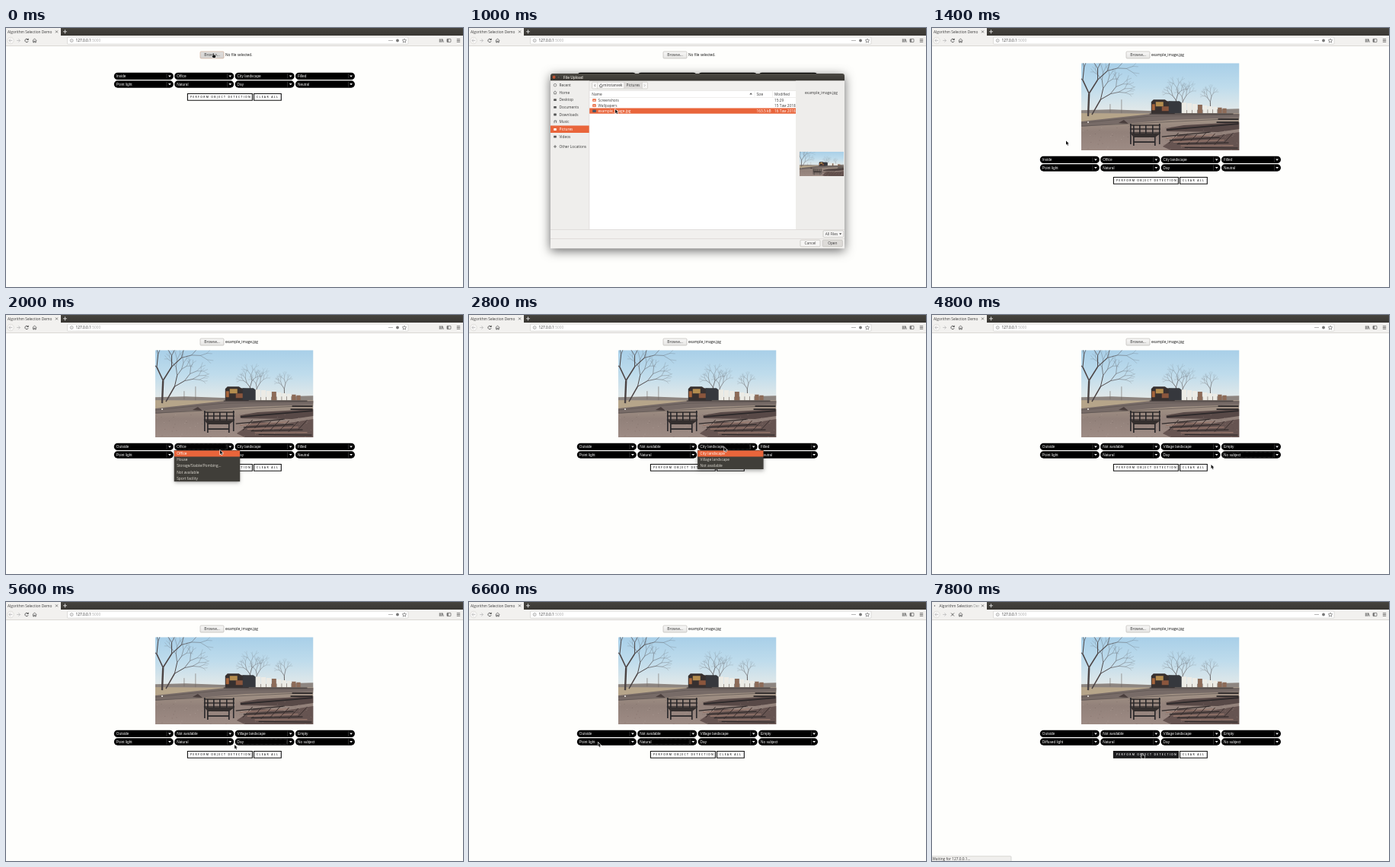
An HTML page with a canvas for the animation above (8 s loop, 600 by 341 pixels).

```html
<!DOCTYPE html>
<html lang="en">
<head>
<meta charset="utf-8">
<title>Algorithm Selection Demo</title>
<style>
  html, body { margin: 0; width: 100%; height: 100%; overflow: hidden; background: #fefefc; }
  canvas { display: block; width: 100vw; height: 100vh; }
</style>
</head>
<body>
<canvas id="stage"></canvas>
<script>
const STEP = 200, LOOP = 8000;
const UI = '4.8px "Open Sans", sans-serif';
const UI_BOLD = '600 4.8px "Open Sans", sans-serif';
const FORM = '4.75px "Liberation Sans", Arial, sans-serif';
const CAPS = '600 3.4px "Open Sans", sans-serif';
const ORANGE = '#e9653b', DARK = '#3d3b36', INK = '#3b3b3b';

const canvas = document.getElementById('stage');
const scale = window.devicePixelRatio || 1;
canvas.width = 600 * scale;
canvas.height = 341 * scale;
const ctx = canvas.getContext('2d');

// ---------- drawing helpers ----------
function rect(x, y, w, h, fill, stroke, radius = 0, lineWidth = 0.6) {
  ctx.beginPath();
  ctx.roundRect(x, y, w, h, radius);
  if (fill) { ctx.fillStyle = fill; ctx.fill(); }
  if (stroke) { ctx.strokeStyle = stroke; ctx.lineWidth = lineWidth; ctx.stroke(); }
}
function circle(x, y, r, fill, stroke) { rect(x - r, y - r, 2 * r, 2 * r, fill, stroke, r); }
function line(d, color = INK, width = 0.8) {
  ctx.strokeStyle = color;
  ctx.lineWidth = width;
  ctx.stroke(new Path2D(d));
}
function shape(d, color) {
  ctx.fillStyle = color;
  ctx.fill(new Path2D(d));
}
function text(s, x, y, color = INK, font = UI, spacing = 0, align = 'left') {
  ctx.font = font;
  ctx.letterSpacing = spacing + 'px';
  ctx.textAlign = align;
  ctx.fillStyle = color;
  ctx.fillText(s, x, y);
}
function vertical(y0, y1, ...colors) {
  const g = ctx.createLinearGradient(0, y0, 0, y1);
  colors.forEach((c, i) => g.addColorStop(i / (colors.length - 1), c));
  return g;
}
function withShadow(blur, offset, alpha, draw) {
  ctx.save();
  ctx.shadowColor = `rgba(0,0,0,${alpha})`;
  ctx.shadowBlur = blur * scale;
  ctx.shadowOffsetY = offset * scale;
  draw();
  ctx.restore();
}
function seeded(seed) {
  return () => (seed = (seed * 16807) % 2147483647) / 2147483647;
}

// ---------- photograph, 208 by 115 units ----------
function tree(x, y, length, angle, width, depth, random) {
  const x2 = x + length * Math.cos(angle), y2 = y + length * Math.sin(angle);
  line(`M${x} ${y}L${x2} ${y2}`, '#4b4343', width);
  if (!depth) return;
  for (const turn of [-0.45, 0.4]) {
    tree(x2, y2, length * (0.65 + 0.25 * random()), angle + turn * (0.6 + 0.8 * random()),
      width * 0.65, depth - 1, random);
  }
}
function photo(x, y, width) {
  ctx.save();
  ctx.translate(x, y);
  ctx.scale(width / 208, width / 208);
  ctx.beginPath();
  ctx.rect(0, 0, 208, 115);
  ctx.clip();
  rect(0, 0, 208, 66, vertical(0, 64, '#a8cfe8', '#bfdcec', '#e3e9e9'));
  shape('M0 62L40 61L95 63L208 60V70H0Z', '#8d8580');
  rect(0, 66, 208, 49, vertical(66, 115, '#aa9b8b', '#92817a', '#9d8b84'));
  shape('M0 66L92 67L60 74L0 80Z', '#b6a58a');
  shape('M0 77L90 67H208V72L120 75L0 84Z', '#776b67');

  tree(9, 70, 30, -1.53, 2.4, 6, seeded(12));
  tree(14, 68, 23, -1.05, 1.5, 5, seeded(31));
  tree(125, 60, 11, -1.6, 1, 5, seeded(7));
  tree(131, 60, 10, -1.3, 0.8, 5, seeded(19));
  tree(170, 60, 9, -1.6, 0.8, 5, seeded(44));
  line('M53 48V66M38 54V65', '#716762', 0.6);

  shape('M92 51L95 48H110L113 50L123 51V67H92Z', '#37302f');
  rect(93, 54, 4, 8, '#a5643b');
  rect(98, 51, 10, 6, '#b48d4f');
  rect(106, 57, 10, 6, '#8a563d');
  shape('M115 50H129L133 53V66H115Z', '#36383d');
  for (let i = 0; i < 9; i++) {
    const left = 132 + i * 7.3 - i * i * 0.07, top = 52 + i * 0.95;
    rect(left, top, 6.4 - i * 0.15, 66 - top, i === 3 || i > 6 ? '#8c6b58' : '#ecebe5');
  }
  line('M90 67H200', '#433d3c', 1.4);
  line('M0 79L90 70L208 68M0 83L208 73', '#5c5350', 0.7);
  shape('M49 79L56 75L62 80Z', '#493e3c');
  circle(9, 78, 1, '#f2eee8');

  shape('M112 86L135 82L208 78V87L180 91L112 90Z', '#584947');
  shape('M107 110L130 94L170 97L208 91V115H118Z', '#665451');
  for (let i = 0; i < 7; i++) {
    line(`M${106 + i * 5} ${97 + i * 2.4}L${170 + i * 6} ${91 + i * 3.5}`, i % 2 ? '#99796d' : '#302a2a', 1.3);
    line(`M${128 + i * 12} ${92 + i % 3}l-13 14`, '#3a302f', 1);
  }
  line('M112 88L207 80M180 74H207M178 78H207', '#2c2829', 1.8);

  line('M64 82H104M64 87H104M64 92H104', '#322c2b', 1.5);
  line('M65 80V107M69 82V97M77 82V93M85 82V93M94 82V93M103 80V107', '#28272a', 1.6);
  shape('M65 93H104L97 98H69Z', '#342f2e');
  line('M69 97V109M97 97V109M69 104H97', '#292729', 1.7);

  const random = seeded(99);
  for (let i = 0; i < 90; i++) {
    rect(random() * 208, 83 + random() * 32, 1.2, 0.5, i % 2 ? 'rgba(60,45,42,.3)' : 'rgba(220,205,195,.35)');
  }
  ctx.restore();
}

// ---------- browser window ----------
function browser(loading) {
  rect(0, 0, 600, 341, '#fefefc');
  rect(0, 0, 600, 10.5, vertical(0, 10, '#45433e', '#393733'));
  rect(0, 0, 72, 11, '#f2f1ef');
  ctx.save();
  ctx.beginPath();
  ctx.rect(0, 0, 62, 10);
  ctx.clip();
  text('Algorithm Selection Demo', loading ? 9.5 : 2, 6.8);
  ctx.restore();
  if (loading) {
    circle(3.5, 5, 0.7, '#555');
    rect(54, 1, 9, 8, 'rgba(242,241,239,.5)');
  }
  line('M65 3.4l3 3m0-3l-3 3', '#555', 0.7);
  line('M75 4.8h5M77.5 2.3v5', '#ddd', 0.9);

  rect(0, 10, 600, 13.3, '#f2f1ef');
  rect(0, 23.1, 600, 0.6, '#cfcdca');
  circle(6, 16.5, 4.3, '#f7f6f5', '#d4d2cf');
  line('M8.2 16.5H4M6 14.4l-2.1 2.1l2.1 2.1', '#bbb');
  line('M14.3 16.5h4.2M16.5 14.4l2.1 2.1l-2.1 2.1', '#bbb');
  if (loading) line('M25 14.5l4 4m0-4l-4 4', '#444');
  else {
    line('M28.7 15A2.2 2.2 0 1 0 29.2 17.2', '#444');
    shape('M29.6 13.4V16H27Z', '#444');
  }
  line('M34.8 16.7L37.5 14l2.7 2.7M35.7 16.3v2.7h1.2v-1.7h1.2v1.7h1.2v-2.7', '#444', 0.7);

  rect(80.5, 12, 447.5, 9.2, '#fff', '#cbc9c6', 1);
  circle(86.2, 16.5, 2, null, '#888');
  line('M86.2 16v1.7M86.2 15v.6', '#888', 0.5);
  text('127.0.0.1', 91.5, 18.3, '#222');
  text(':5000', 112, 18.3, '#aaa');
  for (const x of [503, 505, 507]) circle(x, 16.5, 0.55, '#555');
  circle(514, 16.5, 1.9, '#777');
  line('M523 14l.8 1.7 1.9.2-1.4 1.3.4 1.9-1.7-1-1.7 1 .4-1.9-1.4-1.3 1.9-.2Z', '#555', 0.6);
  line('M569.3 14.3v4.5M570.8 14.3v4.5M572.3 14.3v4.5M573 14.5l1.4 4.3', '#444', 0.7);
  rect(579, 14.4, 5, 4.2, null, '#444', 0.5);
  rect(579, 14.4, 2, 4.2, '#777');
  line('M591.8 14.7h4.4M591.8 16.5h4.4M591.8 18.3h4.4', '#444', 0.7);

  if (loading) {
    rect(-1, 334.7, 105, 8, '#f0efed', '#c5c3c0', 1);
    text('Waiting for 127.0.0.1…', 0.5, 340.1);
  }
}

// ---------- page ----------
const selects = [
  ['Inside', 'Outside'],
  ['Office', 'House', 'Storage/Stable/Pombing...', 'Not available', 'Sport facility'],
  ['City landscape', 'Village landscape', 'Not available'],
  ['Filled', 'Empty'],
  ['Point light', 'Diffused light', 'Not available'],
  ['Natural', 'Artificial', 'Not available'],
  ['Day', 'Night', 'Not available'],
  ['Neutral', 'Happy', 'Sad', 'Angry', 'Surprised', 'Scared', 'Disgusted', 'No subject'],
].map((options, i) => ({ options, x: 141.8 + (i % 4) * 79.4, y: i < 4 ? 58.7 : 69.3 }));

function selectBox(index, value, focused, shift) {
  const { options, x, y: base } = selects[index], y = base + shift;
  rect(x, y, 78, 9.4, '#000', null, 4.7);
  rect(x + 69, y + 1, 0.4, 7.4, '#666');
  shape(`M${x + 71.2} ${y + 3.8}h3.8l-1.9 2.2Z`, '#fff');
  text(options[value], x + 3, y + 6.4, '#f4f4f4', FORM);
  if (focused) {
    ctx.setLineDash([0.6, 0.6]);
    rect(x + 2, y + 1.3, 66, 6.8, null, '#999', 0, 0.4);
    ctx.setLineDash([]);
  }
}
function dropdown(index, hot, shift) {
  const { options, x, y: base } = selects[index], y = base + shift + 9.4;
  const rowHeight = 8.1;
  withShadow(5, 2, 0.35, () => rect(x - 0.5, y, 86.5, options.length * rowHeight + 0.6, '#403e39'));
  options.forEach((label, i) => {
    const top = y + 0.3 + i * rowHeight;
    if (i === hot) rect(x - 0.2, top, 86, rowHeight, ORANGE);
    text(label, x + 3, top + 5.8, i === hot ? '#fff' : '#dedad2');
  });
}
function outlineButton(label, x, y, width, pressed) {
  rect(x, y, width, 8.7, pressed ? '#1d1d1f' : '#fff', '#111', 0, 1.1);
  text(label, x + 3.5, y + 5.7, pressed ? '#fff' : '#222', CAPS, 1.33);
}
function page(s) {
  const shift = s.loaded ? 110 : 0;
  rect(255, 31, 31, 9, vertical(31, 40, s.hoverBrowse ? '#dedddc' : '#f8f8f7', s.hoverBrowse ? '#d5d3d1' : '#e6e5e3'),
    s.hoverBrowse ? '#c9a18c' : '#b4b1ad', 1.2);
  text('Browse...', 270.5, 37.3, '#333', UI, 0, 'center');
  text(s.loaded ? 'example_image.jpg' : 'No file selected.', 288, 37.3, '#111');
  if (s.loaded) photo(196, 46.3, 207.5);
  selects.forEach((_, i) => selectBox(i, s.values[i], s.focus === i, shift));
  outlineButton('PERFORM OBJECT DETECTION', 238.4, 86.5 + shift, 85, s.pressed);
  outlineButton('CLEAR ALL', 325.5, 86.5 + shift, 35.8);
  if (s.open !== null) dropdown(s.open, s.hot, shift);
}

// ---------- file dialog ----------
function dialogButton(label, x, y, width, fill = '#f6f5f4') {
  rect(x, y, width, 8.6, fill, '#b8b5b1', 1.2);
  text(label, x + width / 2, y + 6, INK, UI, 0, 'center');
}
function fileDialog(selected) {
  withShadow(14, 3, 0.6, () => rect(107, 60, 386, 230.3, '#f1f0ee', null, [3, 3, 0, 0]));
  rect(107, 60, 386, 9.5, vertical(60, 69, '#4b4943', '#393733'), null, [3, 3, 0, 0]);
  circle(111.6, 64.8, 2.2, ORANGE, '#2d2b28');
  line('M110.8 64l1.6 1.6m0-1.6l-1.6 1.6', '#50291b', 0.5);
  circle(117.6, 64.8, 1.9, '#56534d', '#2d2b28');
  text('File Upload', 124, 66.6, '#e6e2da', UI_BOLD);

  rect(107, 69.5, 51, 195.5, '#efeeec');
  rect(158, 82, 271, 183, '#fff');
  rect(157.7, 69.5, 0.5, 195.5, '#d0cdca');
  const places = ['Recent', 'Home', 'Desktop', 'Documents', 'Downloads', 'Music', 'Pictures', 'Videos', 'Other Locations'];
  places.forEach((name, i) => {
    const y = 75.2 + i * 9.7 + (i === 8 ? 3.3 : 0), active = i === 6;
    const color = active ? '#fff' : '#555';
    if (active) rect(107, y - 4.8, 50.7, 9.4, ORANGE);
    if (i === 0) circle(113, y, 1.8, null, color);
    else if (i === 1) line(`M111 ${y}l2-2l2 2M111.7 ${y}v2h2.6v-2`, color, 0.7);
    else if (i === 5) line(`M112 ${y + 1.5}v-3.2h2.6v3`, color, 0.8);
    else if (i === 8) line(`M111 ${y}h4M113 ${y - 2}v4`, color);
    else rect(111.2, y - 1.4, 3.6, 2.9, color, null, 0.4);
    text(name, 118.5, y + 1.7, active ? '#fff' : INK);
  });

  rect(161.5, 71.2, 73, 8.8, '#f7f6f5', '#c2bfbb', 1.2);
  rect(203.8, 71.5, 23.5, 8.2, '#dedcda');
  line('M168.7 71.2v8.8M203.8 71.2v8.8M227.3 71.2v8.8', '#c2bfbb', 0.5);
  line('M166 74.3l-1.3 1.3l1.3 1.3', '#555', 0.7);
  line('M230 74.3l1.3 1.3l-1.3 1.3', '#999', 0.7);
  line('M171 76l2.3-2.3l2.3 2.3M171.9 75.6v2.3h2.8v-2.3', '#444', 0.7);
  text('mirotanvek', 176, 77.4);
  text('Pictures', 206.5, 77.4);

  rect(158.2, 82, 270.8, 0.5, '#d5d3d0');
  rect(158.2, 91, 270.8, 0.4, '#e0dedb');
  text('Name', 161.3, 88.5);
  text('Size', 377.5, 88.5);
  text('Modified', 401, 88.5);
  shape('M368.3 87.5h3.6l-1.8-2.2Z', '#555');
  line('M375 83v8M398.5 83v8', '#e0dedb', 0.4);
  const files = [['Screenshots', '', '15:29'], ['Wallpapers', '', '15 Там 2018'], ['example_image.jpg', '163.5 kB', '16 Там 2018']];
  files.forEach(([name, size, date], i) => {
    const y = 95 + i * 7.1, active = selected && i === 2;
    const color = active ? '#fff' : INK;
    if (active) rect(158.2, y - 3.6, 270.8, 7.1, ORANGE);
    rect(162.2, y - 1.8, 4.6, 3.6, i < 2 ? ORANGE : '#4c5666', null, 0.4);
    if (i < 2) rect(163.2, y - 0.2, 2.6, 1.2, '#f8d2c3');
    text(name, 169.5, y + 1.7, color);
    text(size, 377.5, y + 1.7, color);
    text(date, 401, y + 1.7, color);
  });

  rect(429, 69.5, 64, 195.5, '#eeedeb');
  if (selected) {
    text('example_image.jpg', 462.5, 87.2, INK, UI, 0, 'center');
    photo(433.8, 162.8, 58.4);
  }
  rect(107, 265, 386, 0.5, '#cfccc9');
  dialogButton('All Files', 465, 266.8, 26.7);
  rect(466, 268, 24.5, 6.4, '#f6f5f4');
  text('All Files', 467.7, 272.8);
  shape('M486 270.2h3.2l-1.6 2Z', '#444');
  rect(107, 277.3, 386, 0.5, '#cfccc9');
  dialogButton('Cancel', 435, 279.2, 26);
  dialogButton('Open', 464.3, 279.2, 26, '#dddbd8');
}

// ---------- timeline ----------
// [step, changes]: each entry updates the state from that step on.
const timeline = [
  [0, { hoverBrowse: true, hand: true }],
  [1, { hoverBrowse: false, hand: false, dialog: true }],
  [4, { fileSelected: true }],
  [6, { dialog: false, loaded: true }],
  [8, { open: 0, hot: 1, focus: 0 }],
  [9, { open: null, pick: [0, 1] }],
  [10, { open: 1, hot: 0, focus: 1 }],
  [11, { hot: 2 }],
  [12, { hot: 3 }],
  [13, { open: null, pick: [1, 3] }],
  [14, { open: 2, hot: 0, focus: 2 }],
  [15, { hot: 1 }],
  [16, { open: null, pick: [2, 1] }],
  [17, { open: 3, hot: 0, focus: 3 }],
  [18, { hot: 1 }],
  [19, { open: null, pick: [3, 1] }],
  [20, { open: 7, hot: 0, focus: 7 }],
  [21, { hot: 4 }],
  [22, { hot: 7 }],
  [23, { open: null, pick: [7, 7] }],
  [26, { open: 6, hot: 0, focus: 6 }],
  [28, { open: null }],
  [29, { open: 5, hot: 0, focus: 5 }],
  [31, { open: null }],
  [34, { open: 4, hot: 0, focus: 4 }],
  [35, { hot: 1 }],
  [36, { open: null, pick: [4, 1] }],
  [38, { hand: true, pressed: true, focus: null }],
  [39, { loading: true }],
];
// [step, x, y] of the pointer tip, linear in between.
const pointer = [
  [0, 271.5, 33], [2, 230, 85], [4, 192, 107], [6, 192, 107], [8, 160, 190], [9, 200, 180],
  [10, 281, 178], [11, 265, 195], [12, 250, 205], [13, 290, 190], [14, 335, 174], [15, 335, 191],
  [16, 370, 180], [17, 415, 174], [18, 418, 190], [19, 418.5, 186], [20, 418, 188], [21, 410, 226],
  [22, 405, 249], [23, 392, 226], [24, 366.5, 197], [26, 340, 185], [27, 330, 194], [28, 300, 188],
  [29, 262, 184], [30, 255, 193], [31, 240, 190], [33, 169.5, 185], [34, 169, 186], [35, 168, 201],
  [36, 185, 199], [38, 275.5, 199.5], [39, 275.5, 199.5],
];

function stateAt(step) {
  const state = { open: null, focus: null, values: selects.map(() => 0) };
  for (const [start, { pick, ...changes }] of timeline) {
    if (start > step) break;
    Object.assign(state, changes);
    if (pick) state.values[pick[0]] = pick[1];
  }
  return state;
}
function pointerAt(step) {
  const next = pointer.findIndex(p => p[0] >= step);
  const [s1, x1, y1] = pointer[next], [s0, x0, y0] = pointer[Math.max(0, next - 1)];
  const f = s1 === s0 ? 1 : (step - s0) / (s1 - s0);
  return [x0 + (x1 - x0) * f, y0 + (y1 - y0) * f];
}
function drawPointer([x, y], hand) {
  ctx.save();
  ctx.translate(x, y);
  const d = hand
    ? 'M0 0.5Q.6-.4 1.2.5V2.5L3.6 3.1Q4 3.3 3.8 4.2L3.2 6.3H.4L-1.4 3.8Q-1.2 3 0 4Z'
    : 'M0 0V5.2L1.2 4.1L2.1 6.2L3 5.8L2.1 3.8H3.8Z';
  line(d, '#fff', 1.1);
  shape(d, '#111');
  ctx.restore();
}

function render(step) {
  const state = stateAt(step);
  ctx.setTransform(scale, 0, 0, scale, 0, 0);
  browser(state.loading);
  page(state);
  if (state.dialog) fileDialog(state.fileSelected);
  drawPointer(pointerAt(step), state.hand);
}

let shown = -1;
function tick() {
  const step = Math.floor((performance.now() % LOOP) / STEP);
  if (step !== shown) render(shown = step);
  requestAnimationFrame(tick);
}
tick();
</script>
</body>
</html>
```
